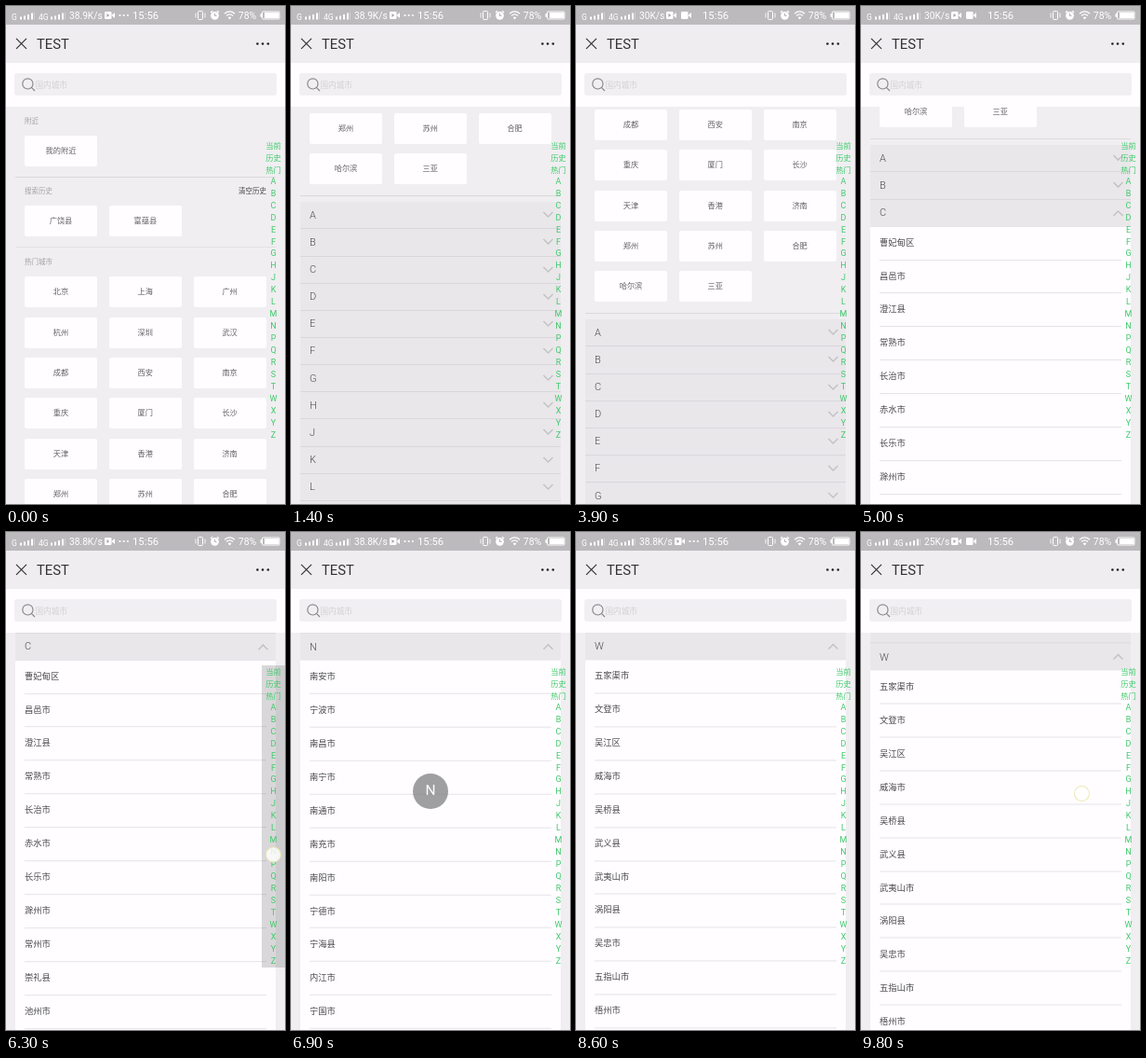
An HTML page that plays this animation: 300x534 px, repeating every 9.9 s.

```html
<!DOCTYPE html>
<html lang="zh-CN">
<head>
<meta charset="utf-8">
<title>TEST</title>
<style>
html, body { margin: 0; width: 100%; height: 100%; overflow: hidden; background: #f0eef1; }
#stage { position: relative; width: 300px; height: 534px; overflow: hidden; background: #f0eef1;
  font-family: "Noto Sans CJK SC", "Noto Sans CJK", sans-serif; color: #555456; }
#stage div, #stage span, #stage svg { position: absolute; box-sizing: border-box; }
span { line-height: 20px; margin-top: -10px; white-space: nowrap; }
.latin { font-family: Roboto, Inter, sans-serif; }
#view { left: 0; top: 108px; width: 300px; height: 426px; overflow: hidden; }
#list { left: 0; top: -108px; width: 300px; }
.label { left: 20px; font-size: 7.5px; color: #a3a2a4; }
.rule { left: 10px; width: 280px; height: 1px; background: #dbd9dc; }
.box { width: 78px; height: 33px; border-radius: 2px; background: #fffdff; font-size: 8.2px;
  line-height: 31.5px; text-align: center; color: #626163; }
#stage #groups { left: 10px; top: 602.2px; width: 280px; }
#stage .group, #stage .body, #stage .head { position: relative; }
.head { height: 29.17px; background: #e9e7ea; border-bottom: 1px solid #dad8db; }
.open .head { border-bottom-color: #e9e7ea; }
.head span { left: 10px; top: 14.5px; font-size: 11px; font-weight: 300; color: #4c4b4d; }
.head svg { left: 260px; top: 9px; width: 13px; height: 9px; }
.open .head svg { transform: translateY(1px) scaleY(-1); }
.body { height: 0; overflow: hidden; background: #fffdff; }
.item { left: 10px; width: 260px; height: 35.9px; border-bottom: 1px solid #e5e3e6;
  font-size: 9.3px; line-height: 33px; color: #4a494b; }
#bar { left: 275px; top: 143px; width: 25px; height: 324px; }
#bar span { left: 0; width: 25px; text-align: center; color: #3fca6b; font-size: 8.3px; }
#bar span.latin { font-size: 9px; }
#toast { left: 131px; top: 259px; width: 38px; height: 38px; border-radius: 50%; background: #6f6e70;
  color: #fff; font-size: 15.5px; line-height: 37px; text-align: center; }
#touch { left: -8.5px; top: -8.5px; width: 17px; height: 17px; border-radius: 50%;
  border: 1px solid rgba(233, 226, 160, .8); background: rgba(255, 255, 255, .82); }
#top { left: 0; top: 0; }
#top text { font-family: Roboto, Inter, sans-serif; fill: #fff; }
</style>
</head>
<body>
<div id="stage">
  <div id="view"><div id="list"></div></div>
  <svg id="top" width="300" height="108" viewBox="0 0 300 108">
    <defs>
      <g id="cam"><rect width="7.5" height="8" rx="1.3" fill="#fff"/><path d="M7.5 4L11 1V7Z" fill="#fff"/></g>
      <g id="signal" fill="#fff"><path d="M0 5h2v3h-2zM4 4h2v4h-2zM8 2.5h2v5.5h-2zM12 1h2v7h-2z"/><path d="M15.5 0h.5v8h-.5z" opacity=".6"/></g>
    </defs>
    <rect width="300" height="20" fill="#bcbabc"/>
    <rect y="20" width="300" height="41" fill="#efedf0"/>
    <rect y="61" width="300" height="47" fill="#fffdff"/>
    <rect x="9" y="72" width="282" height="24" rx="3" fill="#f1eff2"/>
    <text x="6" y="14.5" font-size="8.5">G</text>
    <use href="#signal" x="15" y="6.5"/>
    <text x="35" y="14.5" font-size="8.5">4G</text>
    <use href="#signal" x="48" y="6.5"/>
    <text id="speed" x="68" y="14" font-size="10.2"></text>
    <use id="cam1" href="#cam" y="6"/>
    <path id="play" d="M2.5 8L5.3 10L2.5 12Z" fill="#a5a4a5"/>
    <use id="cam2" href="#cam" x="113" y="6"/>
    <g id="dots" fill="#fff"><circle cx="122.5" cy="10" r="1.1"/><circle cx="126.7" cy="10" r="1.1"/><circle cx="130.9" cy="10" r="1.1"/></g>
    <text x="136" y="14.2" font-size="11.3">15:56</text>
    <g fill="none" stroke="#fff">
      <rect x="206.5" y="5.5" width="5" height="9" rx="1"/>
      <path d="M204 7.5v5M214 7.5v5" stroke-width=".9"/>
      <path d="M235 8.2Q240.5 3.6 246 8.2M237 10.4Q240.5 7.5 244 10.4" stroke-width="1.3"/>
      <path d="M220 7l2-1.8M229 7l-2-1.8" stroke-width="1.2"/>
      <rect x="275.5" y="6" width="18.5" height="8" rx="1"/>
    </g>
    <circle cx="224.5" cy="10.3" r="4.4" fill="#fff"/>
    <path d="M224.5 7.8v2.7h2" fill="none" stroke="#b2b1b2"/>
    <path d="M238.6 12.2Q240.5 10.8 242.4 12.2L240.5 14.4Z" fill="#fff"/>
    <text x="249.8" y="14" font-size="10.5">78%</text>
    <path d="M278 7H293.5V13H278ZM273.5 8.3h1.5v3.4h-1.5z" fill="#fff"/>
    <path d="M11 34.8L22 45.8M22 34.8L11 45.8" stroke="#333234" stroke-width="1.2"/>
    <text x="33" y="46" font-size="14.8" style="fill:#333234">TEST</text>
    <g fill="#222123"><circle cx="270.4" cy="40.5" r="1.3"/><circle cx="276" cy="40.5" r="1.3"/><circle cx="281.8" cy="40.5" r="1.3"/></g>
    <path d="M27.6 87.6L31 91M29 83.4a5.6 5.6 0 1 1-11.2 0a5.6 5.6 0 1 1 11.2 0" fill="none" stroke="#8b8a8c" stroke-width="1.2"/>
  </svg>
  <span style="left:31.5px;top:83.5px;font-size:8.6px;color:#d2d1d3">国内城市</span>
  <div id="bar"></div>
  <div id="toast" class="latin"></div>
  <div id="touch"></div>
</div>
<script>
const $ = id => document.getElementById(id);
const LOOP = 9900, ROW = 29.17, ITEM = 35.9;
const LETTERS = [...'ABCDEFGHJKLMNPQRSTWXYZ'];
const CITIES = {
  A: '安仁县 安宁市 澳门 安丘市 阿合奇县 安新县 安庆市 阿尔山市 安顺市 安陆市 安阳市 安康市 安国市 鞍山市',
  C: '曹妃甸区 昌邑市 澄江县 常熟市 长治市 赤水市 长乐市 滁州市 常州市 崇礼县 池州市 赤峰市 承德市 郴州市',
  N: '南安市 宁波市 南昌市 南宁市 南通市 南充市 南阳市 宁德市 宁海县 内江市 宁国市 南平市 宁乡县 南雄市',
  W: '五家渠市 文登市 吴江区 威海市 吴桥县 武义县 武夷山市 涡阳县 吴忠市 五指山市 梧州市 武穴市 无锡市 芜湖市 温州市 潍坊市 渭南市 万宁市'
};

function add(parent, tag, cls, text, style) {
  const e = parent.appendChild(document.createElement(tag));
  e.className = cls;
  e.textContent = text;
  Object.assign(e.style, style);
  return e;
}

const list = $('list');
const label = (y, text) => add(list, 'span', 'label', text, { top: y + 'px' });
const rule = y => add(list, 'div', 'rule', '', { top: y + 'px' });
const boxes = (y, names) => names.split(' ').forEach((name, i) =>
  add(list, 'div', 'box', name, { left: 20 + i % 3 * 90.8 + 'px', top: y + (i / 3 | 0) * 43.35 + 'px' }));

label(122.5, '附近');
boxes(139, '我的附近');
rule(182.7);
label(197.5, '搜索历史');
add(list, 'span', 'label', '清空历史', { top: '197.5px', left: '250px', color: '#454446' });
boxes(214, '广饶县 富蕴县');
rule(258).style.opacity = .6;
label(274, '热门城市');
boxes(290.3, '北京 上海 广州 杭州 深圳 武汉 成都 西安 南京 重庆 厦门 长沙 天津 香港 济南 郑州 苏州 合肥 哈尔滨 三亚');
rule(594.7);

const groups = add(list, 'div', '', '');
groups.id = 'groups';
const sections = {};
for (const letter of LETTERS) {
  const group = add(groups, 'div', 'group', '');
  const head = add(group, 'div', 'head', '');
  add(head, 'span', 'latin', letter);
  head.insertAdjacentHTML('beforeend',
    '<svg viewBox="0 0 13 9"><path d="M1.5 2L6.5 7L11.5 2" fill="none" stroke="#c3c2c4" stroke-width="1.5"/></svg>');
  if (!CITIES[letter]) continue;
  const body = add(group, 'div', 'body', ''), names = CITIES[letter].split(' ');
  names.forEach((name, i) => add(body, 'div', 'item', name, { top: i * ITEM + 'px' }));
  sections[letter] = { group, body, full: names.length * ITEM };
}
['当前', '历史', '热门', ...LETTERS].forEach((name, i) =>
  add($('bar'), 'span', i > 2 ? 'latin' : '', name, { top: 6 + i * 12.94 + 'px' }));

// letter, opened, closed, collapse duration
const OPEN = [['A', 1700, 3200, 200], ['C', 4800, 6450, 0], ['N', 6480, 7650, 0], ['W', 7750, LOOP, 0]];
const topOf = letter => 493.5 + LETTERS.indexOf(letter) * ROW;
const END = 721.6;
// time, scroll offset, 1 = eased arrival
const SCROLL = [
  [0, 0], [680, 0], [1000, 180], [1600, 400, 1], [1750, 400], [2100, topOf('A'), 1],
  [2150, topOf('A')], [2350, 447], [2500, 436, 1], [3350, 436], [3650, 295],
  [3900, 266, 1], [4300, 261, 1], [4850, 261], [5350, topOf('C'), 1], [6450, topOf('C')],
  [6450, END], [6560, END], [6950, topOf('N'), 1], [7650, topOf('N')], [7650, END],
  [7860, END], [8400, topOf('W'), 1], [8630, topOf('W')], [9100, 1140, 1], [9200, 1140],
  [9750, 1007.5], [LOOP, 1007.5]
];
// from, to, x, y, end y
const TOUCHES = [
  [650, 1000, 200, 430, 250], [1650, 1780, 255, 216, 216], [2150, 2350, 225, 240, 287],
  [2950, 3180, 262, 180, 180], [3350, 3650, 230, 300, 440], [4750, 4880, 255, 413, 413],
  [5650, 6250, 287, 214, 345.5], [6250, 6420, 287, 345.5, 345.5],
  [7200, 7600, 287, 345, 420], [7600, 7680, 287, 420, 420],
  [8630, 8900, 236, 390, 292], [9200, 9750, 237, 148, 280], [9750, LOOP, 237, 280, 280]
];
const PRESSED = [[5650, 6420], [7200, 7680]];
const TOASTS = [[6450, 7000, 'N'], [7680, 8350, 'W']];
const SPEEDS = [[0, '38.9K/s'], [2800, '30K/s'], [5800, '38.8K/s'], [8800, '25K/s']];

const clamp = v => Math.max(0, Math.min(1, v));
const easeOut = p => 1 - (1 - p) ** 3;
const during = t => ([from, to]) => t >= from && t < to;

function scrollAt(t) {
  const i = SCROLL.findIndex(k => k[0] > t);
  const [t0, a] = SCROLL[i - 1], [t1, b, eased] = SCROLL[i];
  const p = (t - t0) / (t1 - t0);
  return a + (b - a) * (eased ? easeOut(p) : p);
}

function draw(t) {
  list.style.transform = `translateY(${-scrollAt(t)}px)`;

  for (const [letter, from, to, fall] of OPEN) {
    const s = sections[letter], open = t >= from && t < to;
    let size = 0;
    if (open) size = easeOut(clamp((t - from - 80) / 260));
    else if (t >= to && fall) size = 1 - clamp((t - to) / fall);
    s.group.classList.toggle('open', open);
    s.body.style.height = size * s.full + 'px';
  }

  $('bar').style.background = PRESSED.some(during(t)) ? 'rgba(0,0,0,.15)' : 'none';

  const touch = TOUCHES.find(during(t));
  $('touch').style.opacity = touch ? 1 : 0;
  if (touch) {
    const [from, to, x, y0, y1] = touch;
    $('touch').style.transform = `translate(${x}px,${y0 + (y1 - y0) * (t - from) / (to - from)}px)`;
  }

  const toast = TOASTS.find(during(t));
  $('toast').style.opacity = toast ? clamp((toast[1] - t) / 150) : 0;
  $('toast').textContent = toast ? toast[2] : '';

  const speed = SPEEDS.filter(s => s[0] <= t).pop()[1], long = speed.length > 5;
  $('speed').textContent = speed;
  $('cam1').setAttribute('x', long ? 106 : 97);
  $('play').setAttribute('transform', `translate(${long ? 106 : 97})`);
  $('cam2').style.display = long ? 'none' : '';
  $('dots').style.display = long ? '' : 'none';
}

const start = performance.now();
function tick() {
  draw((performance.now() - start) % LOOP);
  requestAnimationFrame(tick);
}
tick();
</script>
</body>
</html>
```
